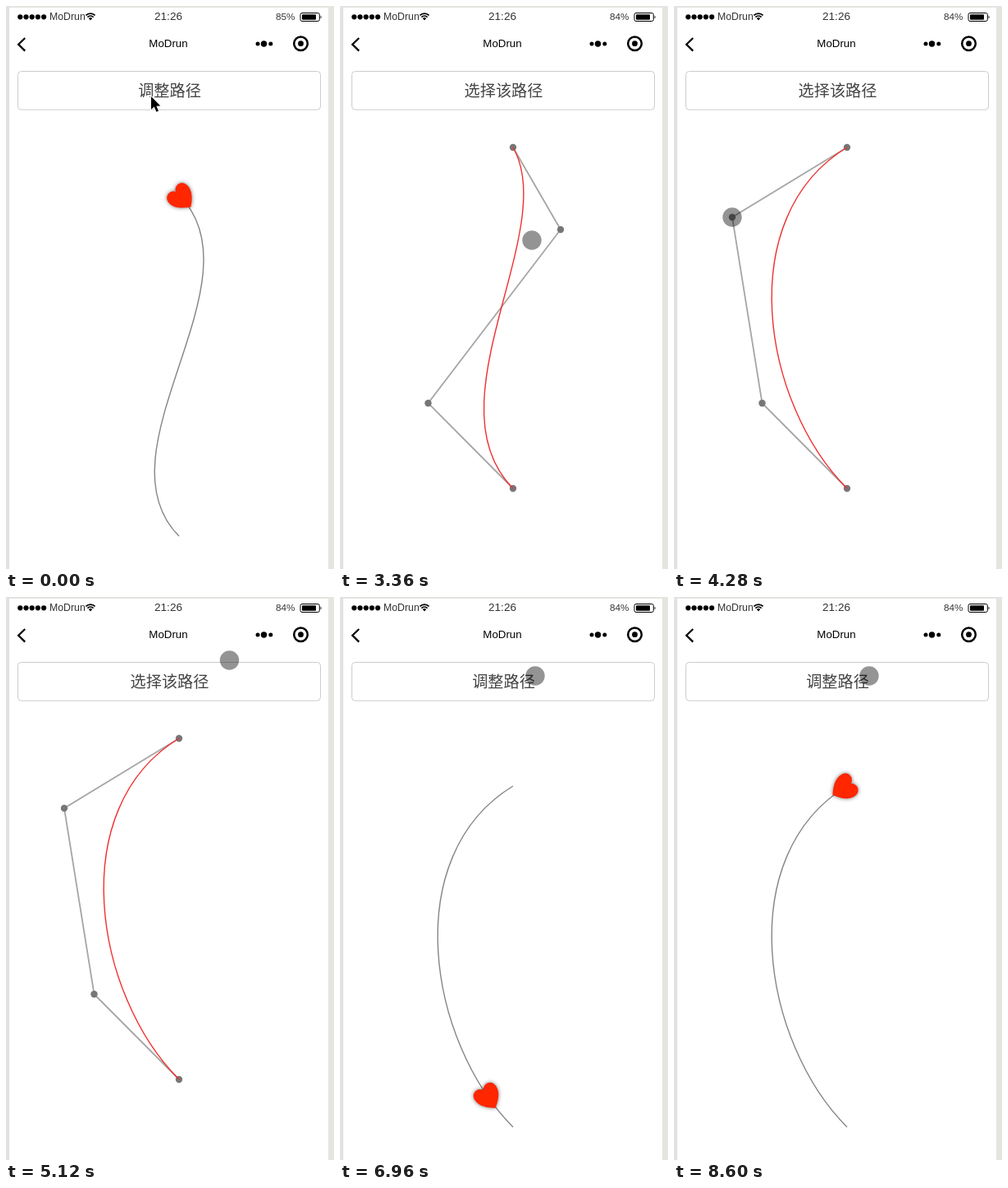
Recreate the animation shown at these times as an HTML page with a canvas. Size 400 px wide and 685 px high, loop 8640 ms.

```html
<!DOCTYPE html>
<html lang="zh-CN">
<head>
<meta charset="utf-8">
<title>路径动画</title>
<style>
  html, body { margin: 0; width: 100%; height: 100%; overflow: hidden; background: #e5e4e0; }
  svg, canvas { position: absolute; left: 0; top: 0; width: 400px; height: 685px; }
  text { font-family: "Liberation Sans", Arial, sans-serif; fill: #333; }
  #label { font: 300 19.2px "Noto Sans CJK SC", "Noto Sans CJK", sans-serif; fill: #444; }
</style>
</head>
<body>
<svg viewBox="0 0 400 685">
  <rect width="4" height="685" fill="#e2e2e2"/>
  <rect x="4" y="2" width="389" height="683" fill="#fff"/>
  <g fill="#000">
    <circle cx="17.3" cy="13.3" r="3.1"/>
    <circle cx="24.5" cy="13.3" r="3.1"/>
    <circle cx="31.7" cy="13.3" r="3.1"/>
    <circle cx="38.9" cy="13.3" r="3.1"/>
    <circle cx="46.1" cy="13.3" r="3.1"/>
    <circle cx="307" cy="46" r="2.5"/>
    <circle cx="314.5" cy="46" r="3.7"/>
    <circle cx="322.8" cy="46" r="2.5"/>
    <circle cx="359.5" cy="45.7" r="3.4"/>
    <path d="M103 17.6l-2.2-2.6a3.2 3.2 0 0 1 4.4 0z"/>
    <rect x="361" y="10.2" width="17" height="6.6" rx="1"/>
    <path d="M383.6 11.5q2 2 0 4z"/>
  </g>
  <g fill="none" stroke="#000">
    <path d="M97.4 11.4a8 8 0 0 1 11.2 0M99.4 13.6a5.2 5.2 0 0 1 7.2 0" stroke-width="1.7"/>
    <rect x="359" y="8.5" width="23.3" height="10" rx="2"/>
    <path d="M23.2 39l-8 7.8 8 7.8" stroke-width="2.3"/>
    <circle cx="359.5" cy="45.7" r="8.3" stroke-width="2.5"/>
  </g>
  <text x="53" y="17" font-size="12.3">MoDrun</text>
  <text x="198" y="17.3" font-size="13.6" text-anchor="middle">21:26</text>
  <text id="battery" x="329" y="17" font-size="11.7">85%</text>
  <text x="198" y="50" font-size="13.3" text-anchor="middle" style="fill:#000">MoDrun</text>
  <rect x="14.5" y="79.5" width="369" height="46.7" rx="4" fill="#fff" stroke="#ccc"/>
  <text id="label" x="199.5" y="110" text-anchor="middle">调整路径</text>
</svg>
<canvas id="view"></canvas>
<script>
const LOOP = 8640, STEP = 40;
const EDIT_ON = 480, EDIT_OFF = 5640, POINTER_ON = 200, BATTERY_DROP = 1000;
const FLIGHT_START = 6845, FLIGHT = 1000;
const PLAY_SHIFT = 58;

// Tracks hold [time, x, y]
const pointerTrack = [
  [200, 180, 112], [700, 184, 104], [900, 184, 104], [1480, 201, 188],
  [2200, 304, 272], [2900, 304, 276], [3360, 234, 285], [3800, 124, 294],
  [4160, 71, 257], [4520, 71, 257], [5120, 272.5, 77], [5440, 238, 96]
];
const handleTrack = [
  [2960, 315, 275.75], [3360, 269, 272], [3800, 139, 294], [4240, 71, 257]
];

const canvas = document.getElementById("view");
const battery = document.getElementById("battery");
const label = document.getElementById("label");
const ctx = canvas.getContext("2d");
const ratio = window.devicePixelRatio || 1;
canvas.width = 400 * ratio;
canvas.height = 685 * ratio;

function slope(track, i, k) {
  const a = track[i - 1], b = track[i], c = track[i + 1];
  if (!a || !c || (b[k] - a[k]) * (c[k] - b[k]) <= 0) return 0;
  return (c[k] - a[k]) / (c[0] - a[0]);
}

function follow(track, time) {
  const last = track.length - 1;
  if (time <= track[0][0]) return track[0].slice(1);
  if (time >= track[last][0]) return track[last].slice(1);
  let i = 0;
  while (track[i + 1][0] < time) i++;
  const a = track[i], b = track[i + 1], span = b[0] - a[0];
  const u = (time - a[0]) / span, v = 1 - u;
  return [1, 2].map(k =>
    a[k] * v * v * (1 + 2 * u) + b[k] * u * u * (3 - 2 * u) +
    span * (slope(track, i, k) * u * v * v - slope(track, i + 1, k) * u * u * v));
}

function curve(p, color, width) {
  ctx.beginPath();
  ctx.moveTo(...p[0]);
  ctx.bezierCurveTo(...p[1], ...p[2], ...p[3]);
  ctx.strokeStyle = color;
  ctx.lineWidth = width;
  ctx.stroke();
}

function disc(x, y, r, color) {
  ctx.beginPath();
  ctx.arc(x, y, r, 0, Math.PI * 2);
  ctx.fillStyle = color;
  ctx.fill();
}

function drawEditor(p) {
  ctx.beginPath();
  p.forEach(q => ctx.lineTo(...q));
  ctx.strokeStyle = "#a6a6a6";
  ctx.lineWidth = 1.8;
  ctx.stroke();
  p.forEach(q => disc(...q, 4.2, "#777"));
  curve(p, "#f03030", 1.4);
}

// Travels from the last point of the path to the first
function drawHeart(p, t) {
  const s = 1 - t;
  const at = k => s ** 3 * p[3][k] + 3 * s * s * t * p[2][k] + 3 * s * t * t * p[1][k] + t ** 3 * p[0][k];
  const dir = k => s * s * (p[2][k] - p[3][k]) + 2 * s * t * (p[1][k] - p[2][k]) + t * t * (p[0][k] - p[1][k]);
  ctx.save();
  ctx.translate(at(0), at(1));
  ctx.rotate(Math.atan2(dir(1), dir(0)) + Math.PI / 2);
  ctx.beginPath();
  ctx.moveTo(0, -5.5);
  ctx.bezierCurveTo(3, -12.5, 15.5, -12, 15.5, -1);
  ctx.bezierCurveTo(15.5, 8, 8, 15, 0, 20.5);
  ctx.bezierCurveTo(-8, 15, -15.5, 8, -15.5, -1);
  ctx.bezierCurveTo(-15.5, -12, -3, -12.5, 0, -5.5);
  ctx.shadowColor = "rgba(0,0,0,.55)";
  ctx.shadowBlur = 5 * ratio;
  ctx.fillStyle = "#ff2600";
  ctx.fill();
  ctx.restore();
}

function drawArrow(x, y) {
  const shape = [[0, 0], [0, 16], [3.7, 12.6], [6.4, 18.8], [9, 17.7], [6.4, 11.7], [11.3, 11.5]];
  ctx.beginPath();
  shape.forEach(([dx, dy]) => ctx.lineTo(x + dx, y + dy));
  ctx.closePath();
  ctx.lineWidth = 2;
  ctx.strokeStyle = "#fff";
  ctx.stroke();
  ctx.fillStyle = "#000";
  ctx.fill();
}

function setText(node, value) {
  if (node.textContent !== value) node.textContent = value;
}

function draw(time) {
  const editing = time >= EDIT_ON && time < EDIT_OFF;
  const shift = editing ? 0 : PLAY_SHIFT;
  const path = [[211, 172], follow(handleTrack, time), [107.5, 483.25], [211, 587]]
    .map(([x, y]) => [x, y + shift]);

  setText(battery, time < BATTERY_DROP ? "85%" : "84%");
  setText(label, editing ? "选择该路径" : "调整路径");

  ctx.setTransform(ratio, 0, 0, ratio, 0, 0);
  ctx.clearRect(0, 0, 400, 685);
  if (editing) {
    drawEditor(path);
  } else {
    curve(path, "#858585", 1.4);
    if (time < EDIT_ON) drawHeart(path, 1);
    else if (time > FLIGHT_START) drawHeart(path, Math.min(1, (time - FLIGHT_START) / FLIGHT));
  }
  if (time < POINTER_ON) drawArrow(177, 110);
  else disc(...follow(pointerTrack, time), 11.7, "rgba(0,0,0,.42)");
}

const start = performance.now();
function tick() {
  const time = (performance.now() - start) % LOOP;
  draw(Math.floor(time / STEP) * STEP);
  requestAnimationFrame(tick);
}
tick();
</script>
</body>
</html>
```
